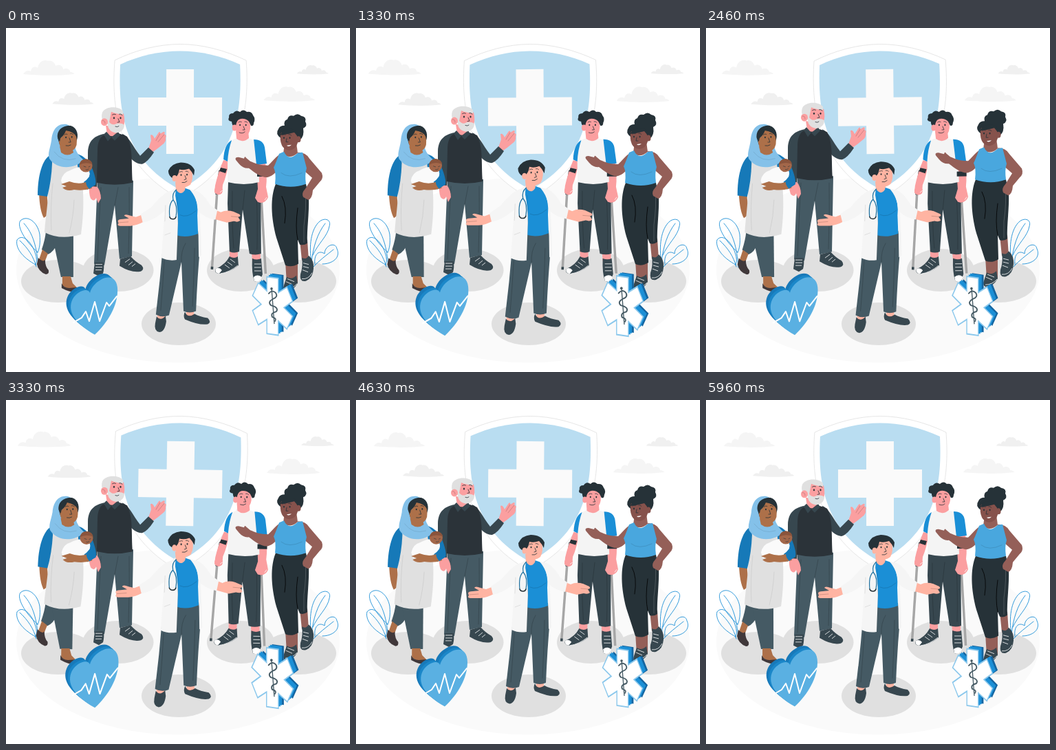
These frames come from a looping animation (500x500 px, 6000 ms). An HTML page:

```html
<!DOCTYPE html>
<html lang="en">
<head>
<meta charset="utf-8">
<title>Health care team</title>
<style>
html, body { margin: 0; width: 100%; height: 100%; overflow: hidden; background: #fff; }
svg { display: block; width: 100vw; height: 100vh; }
.slate { fill: #455a64; } .navy { fill: #37474f; } .ink { fill: #263238; }
.blue { fill: #1b8fd6; } .deep { fill: #1679b8; } .sky { fill: #49a7de; }
.pale { fill: #e0e0e0; } .white { fill: #fafafa; }
.tan { fill: #ad7049; } .pink { fill: #fb9fa0; } .brown { fill: #945f58; } .peach { fill: #ffb4a2; }
.line { fill: none; stroke: #263238; stroke-width: .8; stroke-linecap: round; stroke-linejoin: round; }
.fold { fill: none; stroke: #000; stroke-opacity: .2; stroke-width: .9; stroke-linecap: round; }
.lace { fill: none; stroke: #fff; stroke-width: .8; }
.leaf { fill: none; stroke: #1b8fd6; stroke-width: .9; stroke-linecap: round; }
</style>
</head>
<body>
<svg viewBox="0 0 500 500">
<defs>
  <path id="cloud" d="M0,20C3,15 7,14 11,16C12,10 16,8 21,11C22,3 29,-2 36,1C41,-1 46,4 47,8C52,5 57,8 58,13C64,10 68,14 68,17C71,17 74,19 74,20C50,23 20,22 0,20Z"/>
  <g id="eyes">
    <ellipse class="ink" rx="1.100" ry="1.500"/>
    <ellipse class="ink" cx="9.500" rx="1.100" ry="1.500"/>
    <path class="line" d="M-2.500,-4.500Q0,-6.500 2.500,-5M7.500,-5.500Q10,-6.500 12,-4"/>
  </g>
  <path id="star" d="M-12,-21V-42H12V-21L30,-31L42,-11L24,0L42,11L30,31L12,21V42H-12V21L-30,31L-42,11L-24,0L-42,-11L-30,-31Z"/>
  <path id="heart" d="M122,385C119,377 104,382 97,394C89,410 98,428 129,445.500C148,428 162,404 162,381C162,363 150,359 138,366C129,371 124,378 122,385Z"/>
</defs>

<ellipse class="white" cx="250" cy="351.500" rx="235" ry="135"/>

<g id="clouds" fill="#f5f5f5">
  <use href="#cloud" transform="translate(26 47)"/>
  <use href="#cloud" transform="translate(374 85)"/>
  <g fill="#f0f0f0">
    <use href="#cloud" transform="translate(68 94) scale(.81)"/>
    <use href="#cloud" transform="translate(422 54) scale(.62)"/>
  </g>
</g>

<g id="shield">
  <path fill="#fff" stroke="#e0e0e0" stroke-width=".8" d="M253,23.500C222,23.500 188,32 158,47C153,112 160,200 253,248C346,200 354,112 349,47C318,32 284,23.500 253,23.500Z"/>
  <path fill="#b9ddf1" d="M253,33.500C224,33.500 194,40 166,53C163,115 168,190 253,235C338,190 343,115 340,53C312,40 282,33.500 253,33.500Z"/>
  <path class="white" d="M233,60H273V101H314V142H273V183H233V142H192V101H233Z"/>
</g>

<g class="pale">
  <ellipse cx="163" cy="352" rx="51.500" ry="31"/>
  <ellipse cx="341" cy="352" rx="49" ry="31"/>
  <ellipse cx="76" cy="368" rx="54" ry="31"/>
  <ellipse cx="425" cy="368" rx="55" ry="31"/>
  <ellipse cx="251" cy="430" rx="54" ry="31"/>
</g>

<g id="plants" class="leaf">
  <path d="M46,326C28,310 15,288 21,280C31,271 46,282 49,300C50,312 49,320 46,326Z"/>
  <path d="M43,344C28,336 13,322 16,308C24,298 37,311 42,326C45,334 45,340 43,344Z"/>
  <path d="M26,284C39,298 45,318 47,348M20,309C32,320 40,332 44,347"/>
  <path d="M444,340C440,318 443,292 456,281C464,275 473,279 470,288C468,302 453,314 446,330"/>
  <path d="M449,344C447,330 454,322 463,328C463,316 479,310 481,321C487,334 474,343 460,343"/>
  <path d="M464,284C453,298 446,318 444,342M476,322C466,330 455,338 447,347"/>
</g>

<g id="elder">
  <path class="slate" d="M133,222L128,343L143,345L158,258L165,336L183,332L185,222Z"/>
  <path class="fold" d="M158,258L163,232M138,232Q135,285 133,338M179,232Q180,280 178,328"/>
  <path class="navy" d="M129,341H142Q143,350 141,357L135,361L127,357Z"/>
  <path class="navy" d="M166,336L181,332Q188,340 197,345Q202,351 196,354Q183,357 165,346Z"/>
  <path class="lace" d="M130,344H140M130,348H140M130,352H139M173,341L180,336M178,345L184,340M183,347L188,343"/>
  <path class="pink" d="M121,229L132,230Q138,238 138,248L134,255L131,247Q128,254 123,248Q120,240 121,229Z"/>
  <path class="pink" d="M206,178Q209,170 211,164L210,156Q213,154 216,161L222,152Q225,150 224,154L229,151Q232,151 230,155Q234,155 232,160Q233,166 227,170Q220,176 214,180Z"/>
  <path class="fold" d="M218,164L224,154M221,166L230,155"/>
  <path class="navy" d="M143,154C129,157 120,163 119,181L119,230L132,231L138,177Z"/>
  <path class="navy" d="M169,154C179,158 184,172 195,186L207,174L215,181Q206,195 198,198C188,199 180,188 174,182Z"/>
  <path fill="#2b3339" d="M144,155C136,158 133,167 133,179L132,225Q158,231 184,225C182,200 185,174 176,158Q160,150 144,155Z"/>
  <path class="pink" d="M145,142L147,155Q156,161 162,153V144Z"/>
  <path class="navy" d="M146,151L153,159L148,165L142,155ZM153,159L163,151L166,156L158,164Z"/>
  <path class="pink" d="M147,122Q160,115 171,125Q174,136 170,146Q162,151 150,146Z"/>
  <path class="pale" d="M148,140C142,140 137,132 140,123C144,114 163,113 170,121L170,126Q160,125 153,122L150,137Q155,143 161,139Q168,138 172,141C172,150 163,154 157,152C151,150 148,146 148,140Z"/>
  <ellipse class="pink" cx="143" cy="137" rx="5" ry="5.500"/>
  <path class="fold" d="M140,135Q144,134 144,139"/>
  <use href="#eyes" transform="translate(157 131)"/>
  <path class="line" d="M163,132L165,137L162,137.500M159,143.500Q162,145 164,143"/>
</g>

<g id="mother">
  <path class="slate" d="M75,296L74,314Q70,325 61,329L52,322Q57,307 58,296Z"/>
  <path class="tan" d="M53,322L61,328L56,341L48,337Z"/>
  <path fill="#40383a" d="M47,334Q54,341 57,337Q57,347 62,352Q63,358 58,358Q47,354 45,343Z"/>
  <path class="slate" d="M66,296L80,362H98L98,296Z"/>
  <path class="tan" d="M82,361H94L97,371L104,378L97,384L82,374Z"/>
  <path fill="#40383a" d="M81,371Q84,378 92,378L103,377Q107,381 103,384Q94,385 81,378Z"/>
  <path class="tan" d="M48,240L60,242Q59,254 65,265L64,277Q61,281 59,273L55,276Q49,266 48,240Z"/>
  <path class="pale" d="M66,190C62,212 60,226 61,244C60,264 57,280 56,297Q79,309 109,300C112,278 113,260 112,238L113,192Z"/>
  <path class="fold" d="M68,226Q64,262 66,294M99,250Q98,275 92,298" style="stroke-opacity:.08"/>
  <path class="deep" d="M65,184C52,191 46,216 46,243L60,245Q66,222 67,196Z"/>
  <path class="deep" d="M104,183Q116,187 124,201Q132,220 130,228L118,235L112,222L104,201Z"/>
  <path fill="#84c1e9" d="M88,140C73,138 67,150 66,163C64,176 60,182 63,190C74,206 98,206 113,192C106,186 103,181 101,176L98,150Q96,142 88,140Z"/>
  <path class="fold" d="M70,180Q82,196 101,190" style="stroke-opacity:.1"/>
  <path class="ink" d="M75,160C73,148 83,141 94,142C104,145 106,157 102,165L92,156L80,158L78,170Z"/>
  <path class="tan" d="M78,172L80,181Q89,188 98,181L96,174Z"/>
  <path class="tan" d="M77,161Q84,157 87,149Q99,151 102,158Q105,172 98,177Q91,181 83,177Q76,172 77,161Z"/>
  <path class="ink" d="M75,160Q74,149 87,147Q84,156 79,160L78,165Z"/>
  <use href="#eyes" transform="translate(87 159) rotate(-4) scale(.9)"/>
  <path class="line" d="M92,160L94,166L91,166M87,171Q91,172 94,170"/>
  <path class="white" d="M80,222Q82,210 93,207Q105,200 115,203Q124,207 121,216Q112,229 98,228L83,230Z"/>
  <circle cx="116" cy="200" r="9.500" fill="#a3674a"/>
  <path fill="#8a543c" d="M106.500,199Q108,190 117,190.500Q125,192 125.500,198Q115,194 106.500,199Z"/>
  <path class="line" d="M113,201L116,202M120,202L122,201M116,206Q118,207 120,205" style="stroke-width:.6"/>
  <path class="tan" d="M120,222L125,233Q112,237 99,235Q88,238 82,232L88,230L80,227L92,223Q108,229 120,222Z"/>
  <path class="deep" d="M122,208Q131,216 130,227L121,234Q116,229 116,223Q123,217 122,208Z"/>
</g>

<g id="patient">
  <g fill="none" stroke="#a6a6a6" stroke-width="3.500">
    <path d="M307,236L299.500,350"/>
    <path d="M371,246L377.500,357"/>
  </g>
  <path d="M311,207L306,242M370,213L371,254M299.700,347L299.500,351" fill="none" stroke="#37474f" stroke-width="3.500"/>
  <path class="pink" d="M325,320H337V336H325ZM357,324H370V339H358Z"/>
  <path class="navy" d="M323,223L322,255L325,325Q332,328 339,325L344,264L354,328Q363,331 371,328L370,223Z"/>
  <path class="fold" d="M344,264L347,236M329,237Q328,280 331,320M364,240Q366,284 365,322"/>
  <path class="navy" d="M325,332Q332,336 337,332L338,345Q325,356 310,357Q302,356 305,350Q319,344 325,332Z"/>
  <path class="navy" d="M358,335Q365,338 371,335L373,358Q369,371 361,368Q357,356 358,335Z"/>
  <path fill="#fff" d="M305,350Q310,347 314,352L310,357Q303,356 305,350ZM360,362Q366,357 372,362Q369,371 361,368Z"/>
  <path class="lace" d="M318,344L325,349M322,340L329,345M326,336L333,341M361,343H371M361,348H371M361,353H371M312,357Q325,355 337,345"/>
  <path class="pink" d="M316,192L324,194Q321,214 315,228L314,240Q308,245 303,239L304,229Q308,211 316,192Z"/>
  <path class="pink" d="M364,196L377,196Q380,215 378,231L381,246Q377,256 366,253L362,247L366,234Z"/>
  <path fill="#f4f4f4" d="M333,161C325,163 322,172 322,190L322,224Q346,230 368,224L367,198L364,164Q352,158 333,161Z"/>
  <path class="blue" d="M328,163Q317,169 316,191L322,194Q323,177 328,163ZM360,162Q374,162 376,174L379,197L364,199Q362,180 360,162Z"/>
  <path class="ink" d="M312,203L321,205L319,211L310,208ZM365,209L379,208V216H365Z"/>
  <path class="pink" d="M334,150L335,161Q344,168 353,160L352,150Z"/>
  <path class="pink" d="M333,133Q343,127 354,134Q357,147 352,154Q346,160 338,156Q332,151 333,133Z"/>
  <path class="ink" d="M332,144Q328,141 328,136Q321,135 324,130Q323,124 330,124Q334,118 340,122Q345,117 350,122Q357,121 359,127Q363,132 360,138Q360,143 356,142L353,136Q348,131 341,132Q335,133 334,142Z"/>
  <ellipse class="pink" cx="332" cy="145" rx="3.500" ry="4.500"/>
  <use href="#eyes" transform="translate(340 141) scale(.9)"/>
  <path class="line" d="M345,143L347,148L344,148M339,152Q344,154 347,151"/>
  <g class="pink"><circle cx="309" cy="236" r="6"/><circle cx="371" cy="247" r="7"/></g>
  <path class="lace" d="M311,239Q313,237 315,236M376,250L379,246"/>
</g>

<g id="athlete">
  <path class="brown" d="M406,340H424L424,370L408,372ZM427,308L438,308L440,338L430,338Z"/>
  <path class="navy" d="M430,334Q436,338 440,331Q448,338 447,350Q446,364 436,368Q426,370 428,358Q432,347 430,334Z"/>
  <path class="navy" d="M408,362Q415,367 422,360L424,371Q417,383 407,383Q401,381 404,374Z"/>
  <path class="lace" d="M407,369L416,373M409,365L419,369M432,342L440,344M432,347L440,349M431,352L439,355M406,380Q416,380 423,372M430,365Q440,366 445,356"/>
  <path class="ink" d="M392,227C384,246 385,275 393,305L406,345Q415,349 425,343L424,308L427,315Q433,317 438,313C437,292 441,270 440,246L436,227Z"/>
  <path class="line" d="M401,245Q409,260 405,284M424,308Q420,290 424,262" style="stroke:#000"/>
  <path class="fold" d="M435,236Q437,262 433,288L433,312" style="stroke:#fff"/>
  <path class="brown" d="M403,182C394,184 390,192 381,200C370,200 362,197 355,194L349,189Q347,186 346,190L338,188Q332,188 334,192L339,198Q345,205 353,204C362,211 373,219 381,217C388,215 392,210 395,206Z"/>
  <path class="brown" d="M424,181Q436,181 441,190L459,211Q462,219 456,224L446,236Q445,249 439,250L432,246Q429,240 435,234L445,218L429,204Z"/>
  <path class="brown" d="M405,168L403,183Q412,192 424,182L422,167Z"/>
  <path class="sky" d="M397,183Q392,197 389,203Q393,211 391,227Q414,235 436,227Q434,213 437,204L431,181L424,182Q411,195 404,180Z"/>
  <path class="fold" d="M400,211Q411,220 430,211" style="stroke-opacity:.13"/>
  <path class="ink" d="M405,142Q403,135 409,133Q411,126 418,128Q424,123 429,128Q437,129 435,136Q439,143 432,146Q434,158 427,163L421,166L399,160Q391,154 396,147Q398,142 405,142Z"/>
  <path fill="#86524c" d="M400,152Q407,154 418,150Q425,155 424,167Q421,177 412,178Q404,177 401,171Q397,162 400,152Z"/>
  <ellipse fill="#86524c" cx="425" cy="162" rx="3.500" ry="4.500"/>
  <path class="ink" d="M399,156Q401,147 415,147Q425,149 424,158L419,152Q409,155 399,156Z"/>
  <use href="#eyes" transform="translate(404 160) scale(.9)"/>
  <path class="line" d="M408,161L407,166L410,166"/>
  <path d="M408,171Q411,174 415,170Z" fill="#fff"/>
</g>

<g id="pulseHeart">
  <use href="#heart" fill="#1879b9" transform="translate(-6.500 -5.500)"/>
  <use href="#heart" fill="#1b87c9" transform="translate(-3 -2.500)"/>
  <use href="#heart" fill="#5ab0e2"/>
  <path fill="none" stroke="#fff" stroke-width="2" stroke-linejoin="round" stroke-linecap="round" d="M98,428L110,421L116,412L121,426L129,398L136,426L146,399L150,404L161,390"/>
</g>

<g id="badge">
  <g transform="matrix(.69 .1 0 .98 387.500 404)">
    <use href="#star" fill="#1565a0" transform="translate(11 -6)"/>
    <use href="#star" class="blue" transform="translate(7 -5)"/>
    <use href="#star" class="blue" transform="translate(4 -3)"/>
    <use href="#star" fill="#fff" stroke="#8cc8ec" stroke-width="2"/>
  </g>
  <path fill="none" stroke="#455a64" stroke-width="1.300" d="M386,378L390,430"/>
  <circle class="slate" cx="386" cy="379" r="1.800"/>
  <path fill="none" stroke="#455a64" stroke-width="1.800" stroke-linecap="round" d="M382,386Q387,380 392,385Q396,391 388,394Q380,398 385,403Q397,406 393,412Q384,414 387,420Q394,422 391,426"/>
</g>

<g id="doctor">
  <path class="peach" d="M220,412H231V427H220ZM262,407H273V420H262Z"/>
  <path class="slate" d="M228,318Q224,368 218,416Q227,421 237,417L255,340L258,411Q267,415 276,411Q278,362 282,318L279,295H245Z"/>
  <path class="fold" d="M255,340Q254,324 261,313M230,338Q228,376 225,410M274,320Q273,364 271,404"/>
  <path class="navy" d="M219,419Q225,426 232,418L233,426Q231,441 223,441.500Q215,440 217,429Z"/>
  <path class="navy" d="M260,412Q264,422 274,415Q281,419 293,421Q299,427 293,430Q281,432 260,423Q257,418 260,412Z"/>
  <path class="peach" d="M200,271L200,282Q191,287 181,288L166,288Q161,287 164,284L163,281Q163,278 170,278L179,277L172,273Q173,270 181,273L189,275Z"/>
  <path class="peach" d="M302,264L312,268Q320,264 330,267L339,271Q342,274 337,275L340,280Q337,283 331,281L321,283Q313,281 303,278Z"/>
  <path class="fold" d="M165,283L178,282M338,275L327,274"/>
  <path fill="#f5f5f5" d="M245,236C232,236 221,250 211,261L196,271L199,283Q214,280 227,269L236,262ZM272,236C284,237 292,250 297,258L307,265L304,279Q288,276 279,266Z"/>
  <path class="blue" d="M246,235L247,301Q262,306 279,299L278,273Q280,256 272,237L260,233Z"/>
  <path class="fold" d="M253,272Q263,277 276,266" style="stroke-opacity:.15"/>
  <path fill="#f5f5f5" d="M247,232Q235,239 232,254Q229,287 226,334Q236,339 248,337L250,284Q250,262 246,244ZM266,234Q279,248 279,268L280,333L284,330Q283,288 281,262Q280,242 272,236Z"/>
  <path class="fold" d="M249,246Q251,282 248,336M232,258L231,281M239,298L231,301" style="stroke-opacity:.1"/>
  <path class="peach" d="M246,224L247,235Q254,245 260,236L262,225Z"/>
  <path class="peach" d="M245,209Q256,199 270,207Q273,219 268,228Q261,234 252,230Q245,226 245,209Z"/>
  <path class="ink" d="M243,219Q236,216 236,208Q241,197 254,196Q269,196 274,207L273,215Q270,209 266,205Q258,208 252,206Q251,213 248,216L246,223Z"/>
  <ellipse class="peach" cx="245" cy="219" rx="3.500" ry="4.500"/>
  <use href="#eyes" transform="translate(254.500 214) rotate(-3) scale(.9)"/>
  <path class="line" d="M260,215L262,220L259,221M256,225Q260,226 263,223"/>
  <path fill="none" stroke="#1b6f9f" stroke-width="1.200" d="M248,235Q241,240 243,250M243,250Q236,256 238,275M243,250Q250,258 247,275"/>
  <path class="line" d="M238,275Q239,278 243,278Q246,278 247,275" style="stroke-width:1.500"/>
</g>
</svg>
<script>
const LOOP = 6000, SWAY = 1500, LEAD = 25;
const node = id => document.getElementById(id);

// Piecewise linear value through [position, value] stops.
function track(stops, p) {
  const i = Math.max(1, stops.findIndex(s => s[0] >= p));
  const [a, from] = stops[i - 1], [b, to] = stops[i];
  return from + (to - from) * (p - a) / (b - a);
}

const beat = [[0, 1], [.1, 1.1], [.3, 1], [.4, 1], [.5, 1.1], [.6, 1], [1, 1]];
const wind = [[0, 0], [.25, 1], [.75, -1], [1, 0]];
const lift = [[0, 0], [.5, -10], [1, 0]];

const beating = { clouds: [247, 80], pulseHeart: [124.5, 400.5], badge: [391, 401], doctor: [251.5, 318.5] };
const swaying = { shield: [253.5, 136], mother: [88, 262], patient: [340, 244] };
const floating = ['elder', 'athlete'];

function render(ms) {
  const t = ms + LEAD;
  const scale = track(beat, t % LOOP / LOOP);
  const phase = t % SWAY / SWAY;
  const angle = track(wind, phase), rise = track(lift, phase);
  for (const [id, [x, y]] of Object.entries(beating))
    node(id).setAttribute('transform', `translate(${x} ${y}) scale(${scale}) translate(${-x} ${-y})`);
  for (const [id, [x, y]] of Object.entries(swaying))
    node(id).setAttribute('transform', `rotate(${angle} ${x} ${y})`);
  for (const id of floating)
    node(id).setAttribute('transform', `translate(0 ${rise})`);
}

const start = performance.now();
function tick() {
  render(performance.now() - start);
  requestAnimationFrame(tick);
}
tick();
</script>
</body>
</html>
```
